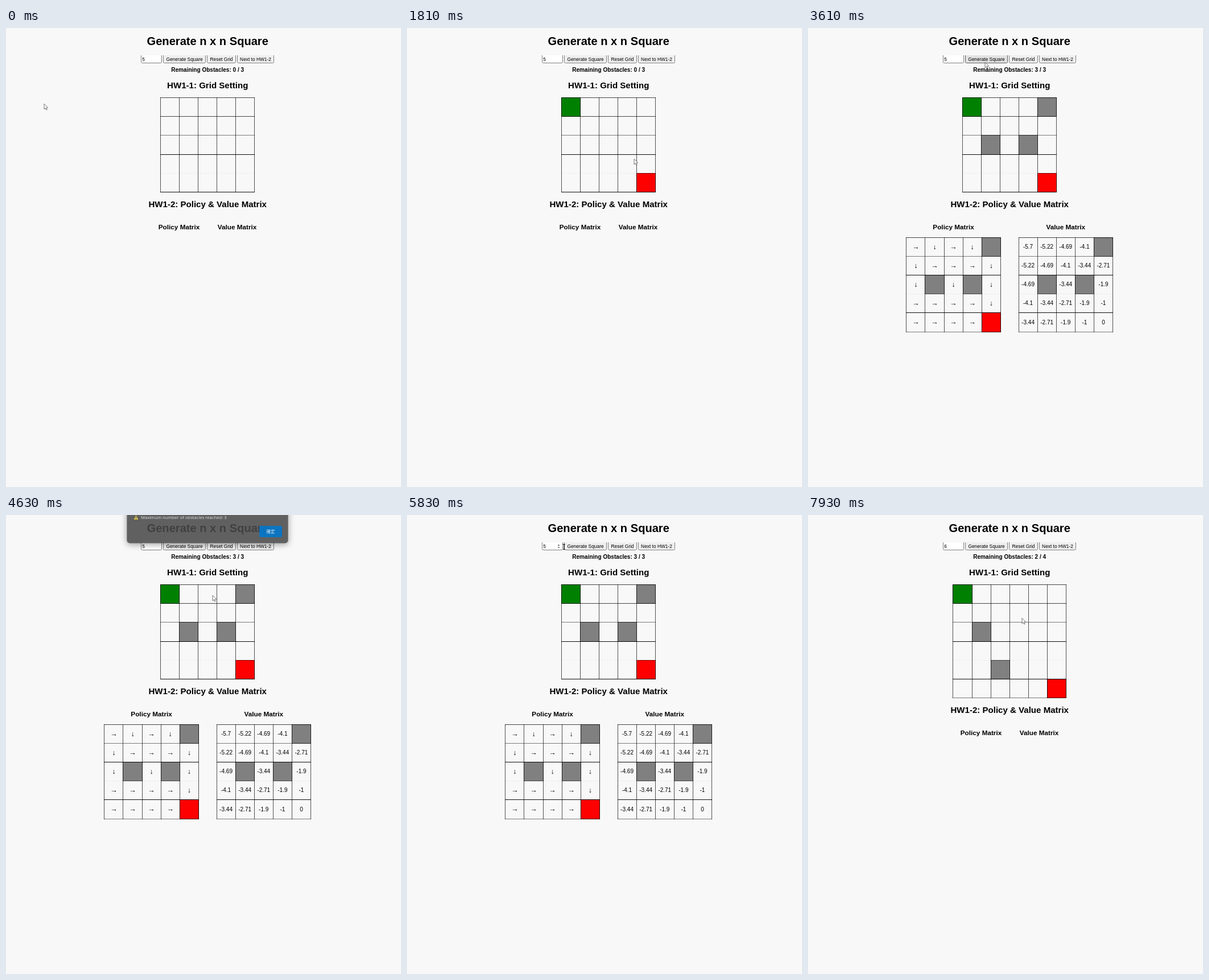
These frames come from a looping animation (694 by 807 pixels, 7.99 s). An HTML page with a canvas:

```html
<!DOCTYPE html>
<html lang="en">
<head>
<meta charset="utf-8">
<title>Generate n x n Square</title>
<style>
  html, body { margin: 0; width: 100%; height: 100%; overflow: hidden; background: #f8f8f8; }
  canvas { display: block; }
</style>
</head>
<body>
<canvas id="stage" width="694" height="807"></canvas>
<script>
const ctx = document.getElementById('stage').getContext('2d');
const LOOP = 7990, TICK = 60;
const CX = 354.2, CELL = 33.1, GRID_Y = 122.2, MATRIX_Y = 368;
const EM = 10.05;
const SANS = '"Liberation Sans", Arial, sans-serif';
const GREEN = '#008000', RED = '#ff0000', GRAY = '#808080';
const SOLVED = 3150, ALERT_ON = 4510, ALERT_OFF = 5140, STEP_UP = 6210, REGEN = 6510;

// pointer script: plain moves, and clicks that mark a cell of an n x n grid
const path = [], marks = [];

function move(t, x, y) {
  path.push({ t, x, y });
}

function mark(t, n, row, col) {
  move(t, CX + (col + .5 - n / 2) * CELL, GRID_Y + (row + .5) * CELL);
  const order = marks.filter(m => m.n === n).length;
  marks.push({ t, n, row, col, color: [GREEN, RED][order] || GRAY });
}

move(370, 67, 133);
mark(980, 5, 0, 0);
mark(1580, 5, 4, 4);
move(1810, 399, 230);
mark(2070, 5, 2, 3);
mark(2400, 5, 2, 1);
mark(2790, 5, 0, 4);
move(SOLVED, 438, 57);
move(3610, 311, 60);
move(4390, 363, 141);
move(4690, 363, 141);
move(ALERT_OFF, 465, 30);
move(5830, 276, 56);
move(5950, 266, 53);
move(STEP_UP, 266, 53);
move(REGEN, 311, 57);
move(6910, 272, 137);
mark(7060, 6, 0, 0);
mark(7360, 6, 5, 5);
mark(7570, 6, 4, 2);
mark(7750, 6, 2, 1);
move(7930, 376, 181);

const policy = ['→↓→↓ ', '↓→→→↓', '↓ ↓ ↓', '→→→→↓', '→→→→ '];

const clamp = v => Math.max(0, Math.min(1, v));
const ease = p => p * p * (3 - 2 * p);

function pointerAt(t) {
  const i = path.findIndex(p => p.t >= t);
  if (i < 1) return path[i ? path.length - 1 : 0];
  const a = path[i - 1], b = path[i];
  const p = ease((t - a.t) / (b.t - a.t));
  return { x: a.x + (b.x - a.x) * p, y: a.y + (b.y - a.y) * p };
}

function text(str, x, y, size, { weight = '', align = 'center', color = '#000', font = SANS } = {}) {
  ctx.font = `${weight} ${size}px ${font}`;
  ctx.textAlign = align;
  ctx.fillStyle = color;
  ctx.fillText(str, x, y);
}

const heading = (str, x, y, size) => text(str, x, y, size, { weight: 'bold' });

function rect(x, y, w, h, color) {
  ctx.fillStyle = color;
  ctx.fillRect(x, y, w, h);
}

// row lines fade at one index and are heaviest right next to it
function grid(cx, y, n, cells, faint) {
  const colX = i => Math.floor(cx + (i - n / 2) * CELL);
  const rowY = i => Math.round(y + i * CELL);
  const width = colX(n) - colX(0) + 1, height = rowY(n) - rowY(0) + 1;
  for (const { row, col, color } of cells) {
    const x0 = colX(col), y0 = rowY(row);
    const w = colX(col + 1) - x0, h = rowY(row + 1) - y0;
    rect(x0, y0, w + 1, h + 1, color);
    ctx.strokeStyle = 'rgba(0,0,0,.45)';
    ctx.lineWidth = 1;
    ctx.strokeRect(x0 + .5, y0 + .5, w, h);
  }
  for (let i = 0; i <= n; i++) {
    const alpha = [.04, .95, .5][Math.abs(i - faint)] ?? .72;
    rect(colX(i), rowY(0), 1, height, 'rgba(0,0,0,.68)');
    rect(colX(0), rowY(i), width, 1, `rgba(0,0,0,${alpha})`);
  }
}

function labels(cx, n, label, size, weight) {
  for (let r = 0; r < n; r++) {
    for (let c = 0; c < n; c++) {
      const x = cx + (c + .5 - n / 2) * CELL, y = MATRIX_Y + (r + .5) * CELL;
      text(label(r, c), x, y + size * .36, size, { weight });
    }
  }
}

// discounted cost of the steps left to the far corner
function valueOf(row, col, n) {
  const steps = 2 * (n - 1) - row - col;
  return String(+(-(1 - .9 ** steps) / .1).toFixed(2));
}

// controls are cut off along their upper edge
function control(x, w, fill, edge) {
  ctx.save();
  ctx.beginPath();
  ctx.rect(x - 1, 48, w + 2, 16);
  ctx.clip();
  ctx.beginPath();
  ctx.roundRect(x + .5, 44.5, w - 1, 17, 2);
  ctx.fillStyle = fill;
  ctx.fill();
  ctx.strokeStyle = edge;
  ctx.lineWidth = 1;
  ctx.stroke();
  ctx.restore();
}

const inside = (p, x, w) => p.x >= x && p.x <= x + w && p.y >= 48 && p.y <= 62;

function button(label, x, w, over) {
  control(x, w, over ? '#e2e2e2' : '#efefef', over ? '#5c5c5c' : '#808080');
  text(label, x + w / 2, 58, 8.37);
}

function polygon(points, fill, stroke) {
  ctx.beginPath();
  points.forEach(([x, y]) => ctx.lineTo(x, y));
  ctx.closePath();
  ctx.fillStyle = fill;
  ctx.fill();
  if (!stroke) return;
  ctx.strokeStyle = stroke;
  ctx.lineWidth = .8;
  ctx.stroke();
}

function spinner(x, y) {
  for (const dir of [-1, 1]) {
    polygon([[x - 2, y + dir], [x, y + dir * 3.5], [x + 2, y + dir]], '#666');
  }
}

function arrow({ x, y }) {
  ctx.save();
  ctx.translate(x, y);
  polygon([[0, .3], [0, 9.8], [2.2, 7.8], [3.7, 11], [5.2, 10.4], [3.8, 7.2], [6.6, 7]], '#fff', '#555');
  ctx.restore();
}

function beam({ x, y }) {
  rect(x - .6, y - 5, 1.3, 10, '#111');
  rect(x - 2, y - 5, 4, 1, '#111');
  rect(x - 2, y + 4, 4, 1, '#111');
}

function dialog(alpha) {
  if (alpha <= 0) return;
  const box = new Path2D(), around = new Path2D();
  box.roundRect(212.5, -20, 283, 69.5, 5);
  around.rect(0, -40, 694, 200);
  around.addPath(box);

  ctx.save();
  ctx.globalAlpha = alpha;
  ctx.fillStyle = '#4a4a4a';

  // the shadow stays outside the translucent box
  ctx.save();
  ctx.clip(around, 'evenodd');
  ctx.shadowColor = 'rgba(0,0,0,.45)';
  ctx.shadowBlur = 12;
  ctx.shadowOffsetY = 2;
  ctx.fill(box);
  ctx.restore();

  ctx.fill(box);
  polygon([[228.5, .5], [232.3, 8], [224.7, 8]], '#f5d74a');
  rect(228, 3, 1, 2.6, '#333');
  rect(228, 6.3, 1, 1, '#333');
  text('Maximum number of obstacles reached: 3', 237, 7, 7.67,
    { align: 'left', color: '#f4f4f4', font: '"Open Sans", sans-serif' });
  ctx.beginPath();
  ctx.roundRect(445, 19, 40, 20, 2);
  ctx.fillStyle = '#0078d0';
  ctx.fill();
  text('確定', 465, 32, 7.5, { color: '#fff', font: '"Noto Sans CJK TC", "Noto Sans CJK", sans-serif' });
  ctx.restore();
}

function draw(t) {
  const pointer = pointerAt(t);
  const n = t < REGEN ? 5 : 6;
  const solved = t >= SOLVED && t < REGEN;
  const cells = marks.filter(m => m.n === n && t >= m.t);
  const blocks = cells.filter(c => c.color === GRAY);
  const overInput = inside(pointer, 237, 40);

  rect(0, 0, 694, 807, '#f8f8f8');
  heading('Generate n x n Square', CX, 30, EM * 2);

  control(237, 37, '#fff', '#808080');
  text(t < STEP_UP ? '5' : '6', 239.3, 58, 8.37, { align: 'left' });
  if (overInput) spinner(266.5, 55);
  const buttons = [['Generate Square', 276, 75], ['Reset Grid', 353, 51], ['Next to HW1-2', 406, 65]];
  for (const [label, x, w] of buttons) {
    button(label, x, w, !overInput && inside(pointer, x, w));
  }

  heading(`Remaining Obstacles: ${blocks.length} / ${n - 2}`, CX, 77, EM);
  heading('HW1-1: Grid Setting', CX, 106, EM * 1.5);
  grid(CX, GRID_Y, n, cells, 4);

  const drop = (n - 5) * CELL;
  const [leftX, rightX] = solved ? [255.6, 452.75] : [304, 406];
  heading('HW1-2: Policy & Value Matrix', CX, 315 + drop, EM * 1.5);
  heading('Policy Matrix', leftX, 353.5 + drop, EM * 1.17);
  heading('Value Matrix', rightX, 353.5 + drop, EM * 1.17);

  if (solved) {
    const blocked = (r, c) => blocks.some(b => b.row === r && b.col === c);
    grid(leftX, MATRIX_Y, n, cells.filter(c => c.color !== GREEN), 3);
    grid(rightX, MATRIX_Y, n, blocks, 3);
    labels(leftX, n, (r, c) => policy[r][c], 12.5, 'bold');
    labels(rightX, n, (r, c) => blocked(r, c) ? '' : valueOf(r, c, n), EM);
  }

  dialog(clamp((t - ALERT_ON) / 138) * clamp((ALERT_OFF + 130 - t) / 130));
  if (overInput && pointer.x > 269) beam(pointer);
  else arrow(pointer);
}

const start = performance.now();
function frame(now) {
  const t = Math.max(0, now - start) % LOOP;
  draw(Math.max(0, Math.floor((t - 10) / TICK) * TICK + 10));
  requestAnimationFrame(frame);
}
draw(0);
requestAnimationFrame(frame);
</script>
</body>
</html>
```
